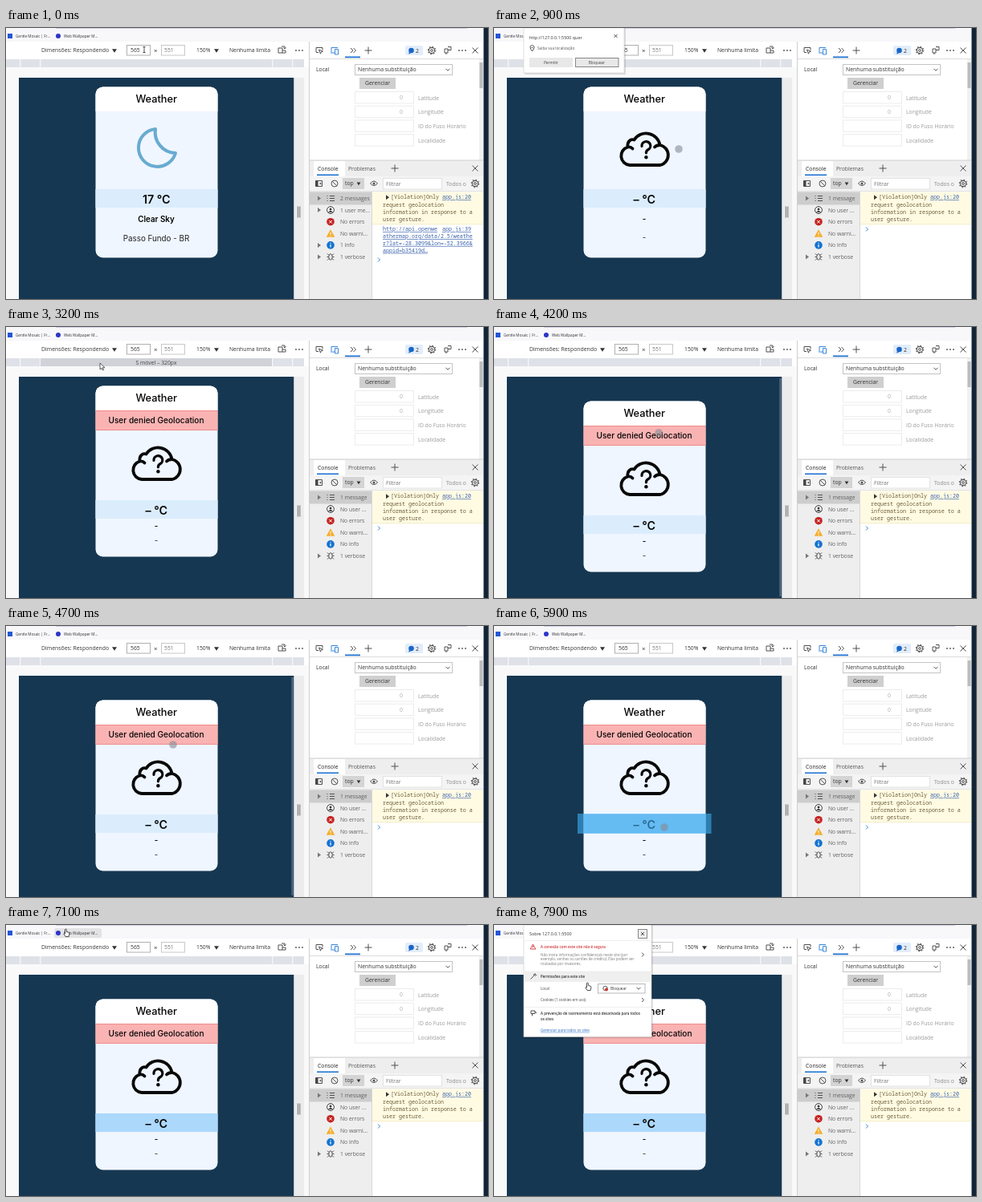
An HTML page for the animation above (8 s loop, 600x338 px).

```html
<!DOCTYPE html>
<html lang="pt-BR">
<head>
<meta charset="utf-8">
<title>Weather</title>
<style>
  html, body { margin: 0; width: 100%; height: 100%; overflow: hidden; background: #fff; }
  svg { display: block; width: 600px; height: 338px; }
  text { font-family: "Open Sans", "Noto Sans", sans-serif; font-size: 6.8px; fill: #333; white-space: pre; }
  .card text { font-family: Inter, Roboto, sans-serif; font-weight: 500; text-anchor: middle; }
  .mono { font-family: "Noto Sans Mono", "DejaVu Sans Mono", monospace; font-size: 6.67px; fill: #6a5c38; }
  .link { fill: #3a62ae; text-decoration: underline; }
  .line { fill: none; stroke: #505050; stroke-width: 1; }
  .blue { stroke: #3a86d8; }
</style>
</head>
<body>
<svg id="stage" viewBox="0 0 600 338"></svg>
<script>
const LOOP = 8000, STEP = 100;

const rect = (x, y, w, h, fill, more = '') =>
  `<rect x="${x}" y="${y}" width="${w}" height="${h}" fill="${fill}" ${more}/>`;
const text = (x, y, s, more = '') =>
  `<text x="${x}" y="${y}" ${more}>${s.replace(/&/g, '&amp;')}</text>`;
const path = (d, more = 'class="line"') => `<path d="${d}" ${more}/>`;
const dot = (x, y, r, fill, more = '') => `<circle cx="${x}" cy="${y}" r="${r}" fill="${fill}" ${more}/>`;
const group = (id, body, more = '') => `<g id="${id}" ${more}>${body}</g>`;
const size = (px, fill = '#333', more = '') => `style="font-size:${px}px;fill:${fill};${more}"`;
const box = (x, y, w, h, stroke, fill = '#fff') =>
  rect(x + .5, y + .5, w - 1, h - 1, fill, `stroke="${stroke}"`);

const plus = (x, y) => path(`M${x - 4.5} ${y}h9M${x} ${y - 4.5}v9`);
const cross = (x, y, r = 3.5) => path(`M${x - r} ${y - r}l${2 * r} ${2 * r}m0 ${-2 * r}l${-2 * r} ${2 * r}`);
const dots = (x, y) => [-4, 0, 4].map(d => dot(x + d, y, .9, '#505050')).join('');
const down = (x, y, r = 3) => path(`M${x - r} ${y - r / 2}h${2 * r}l${-r} ${r * 1.5}z`, 'fill="#333"');
const chevron = (x, y) => path(`M${x - 2.5} ${y - 1.2}l2.5 2.5l2.5 -2.5`);
const play = (x, y, fill = '#777') => path(`M${x} ${y - 3}l4 3l-4 3z`, `fill="${fill}"`);
const gear = (x, y) =>
  dot(x, y, 3.6, 'none', 'stroke="#555" stroke-width="1.1"') + dot(x, y, 1.4, 'none', 'stroke="#555"') +
  dot(x, y, 4.7, 'none', 'stroke="#555" stroke-width="1.2" stroke-dasharray="1.5 2.19"');

function browserBar() {
  return rect(0, 0, 594, 17, '#f8f8fa') + rect(62, 0, 512, .8, '#c6c6e2') +
    group('tabHover', rect(60, 4, 59, 12, '#e3e3e6', 'rx="2"')) +
    rect(2, 7, 6, 6, '#2457d6') + dot(65, 10, 3, '#2b35c8') +
    text(12, 11.8, 'Gentle Mosaic | Fr...', size(4.6)) +
    text(72, 11.8, 'Web Wallpaper M...', size(4.7));
}

function deviceBar() {
  const ticks = [17, 42, 331, 356].map(x => rect(x, 39, 1.4, 10, '#f4f5f9')).join('');
  return rect(0, 17, 377, 22, '#fff') +
    text(44, 30.4, 'Dimensões: Respondendo', size(6.9)) + down(135, 27.7) +
    box(150, 21, 30, 13.5, '#b0b0b0') + text(155, 30.4, '565') +
    text(184, 30.6, '×', size(8)) +
    box(193, 21, 30, 13.5, '#c8c8c8') + text(197, 30.4, '551', size(6.8, '#777')) +
    text(237, 30.4, '150%') + down(262, 27.7) + text(278, 30.4, 'Nenhuma limita') +
    path('M339 25h5v6h-5zM344 28h4v3h-4M343 23h4v3m-1.5 -1.5l1.5 1.5l1.5 -1.5') + dots(365, 28) +
    rect(0, 39, 371, 10, '#dfe1e8') + ticks +
    group('rulerHover', rect(43, 39, 288, 10, '#d0d2d8') +
      text(187, 46.6, 'S móvel – 320px', size(6.8, '#444', 'text-anchor:middle')));
}

function viewport() {
  return rect(0, 49, 377, 289, '#f9f9fa') + rect(16, 62, 342.5, 276, '#163751') +
    group('scrollThumb', rect(355.5, 64, 2, 272, '#9aa8b4', 'opacity=".5"')) +
    rect(358.5, 62, 12.5, 276, '#ececed') + rect(362, 222, 5, 15, '#d0d0d0') +
    path('M363.5 223v13m2.2 -13v13', 'stroke="#888" stroke-width=".9"');
}

function sensors() {
  const fields = ['Latitude', 'Longitude', 'ID do Fuso Horário', 'Localidade'].map((s, i) => {
    const y = 79 + i * 17.7;
    return box(434, y, 74, 15.5, '#ececec') + text(513, y + 10.6, s, size(6.8, '#9a9a9a')) +
      (i < 2 ? text(490, y + 10.2, '0', size(6.8, '#aaa')) : '');
  }).join('');
  return rect(377, 17, 217, 321, '#fff') + rect(377, 17, 1, 321, '#cfcfcf') +
    path('M386 30v-5.5h8v3M386 30.5h3M389.5 27l5 2.2l-2.2 .8l-.8 2.2z') +
    path('M405 30v-5.5h8M404 31h5M409.5 26.5h4v6.5h-4z', 'class="line blue"') +
    path('M429 25l3 3l-3 3m3.5 -6l3 3l-3 3') + rect(422, 35.5, 19, 1.7, '#1a6fd0') + plus(451, 28) +
    rect(497, 22, 22, 12, '#e2edfa', 'rx="2"') + dot(504.5, 28, 3.3, '#1a66c8') +
    path('M502 30l-1 2.5l3 -1z', 'fill="#1a66c8"') + text(510, 30.5, '2') +
    gear(530, 28) + path('M546 26h4v5h-4zM550 23.5h4v4h-4M548 31v2') + dots(568, 28) + cross(584, 28) +
    rect(378, 38, 216, 1, '#dcdcdc') +
    text(386, 54.2, 'Local') + box(434, 45, 122, 14, '#c4c4c4') +
    text(438, 54.2, 'Nenhuma substituição', size(6.9)) + chevron(550, 52) +
    rect(440, 62, 45, 14, '#cfcfcf') + text(462.5, 71.3, 'Gerenciar', size(6.8, '#333', 'text-anchor:middle')) +
    fields + rect(589, 39, 5, 126, '#f1f1f1') + rect(589.5, 43, 4, 32, '#bcbcbc');
}

function consoleBar() {
  return rect(378, 165, 216, 20, '#eeeeef') + rect(378, 164.5, 216, 1, '#cfcfcf') +
    rect(383, 166, 39, 19, '#fff') + text(388, 177.7, 'Console', size(6.8, '#222')) +
    rect(387, 182.5, 27, 1.6, '#1a6fd0') + text(426, 177.7, 'Problemas', size(6.8, '#555')) +
    plus(484, 175) + cross(584, 175) +
    rect(378, 185, 216, 19, '#f4f4f4') + rect(378, 203.5, 216, .8, '#d8d8d8') +
    path('M385.5 190.5h8v7h-8z') + rect(385.5, 190.5, 3, 7, '#444') + path('M390 194l2.2 -1.6v3.2z', 'fill="#444"') +
    dot(409, 194, 4, 'none', 'stroke="#555"') + path('M406.2 191.2l5.6 5.6') +
    rect(419, 187, 27, 14, '#d4d4d5') + text(422, 196.3, 'top') + down(439, 193.8, 2.4) +
    path('M453.5 194q4.5 -6 9 0q-4.5 5 -9 0z') + dot(458, 194, 1.5, '#555') +
    box(469, 187, 74, 14.5, '#e2e2e2') + text(473, 196.5, 'Filtrar', size(6.8, '#777')) +
    text(548, 196.5, 'Todos o', size(6.8, '#888')) + gear(584, 194);
}

const rowY = i => 212.5 + i * 14.6;

function sidebar() {
  const people = rowY(1), err = rowY(2), warn = rowY(3), info = rowY(4), bug = rowY(5);
  return rect(378, 204, 77, 134, '#eeeeee') + rect(378, 204.5, 77, 16, '#cdcdcd') +
    rect(455, 204, .8, 134, '#cfcfcf') +
    path('M403 209.5h6m-6 3h6m-6 3h6M399.5 209.5h1m-1 3h1m-1 3h1') +
    dot(404, people, 4.4, '#fff', 'stroke="#333"') + dot(404, people - 1.2, 1.5, '#333') +
    path(`M401 ${people + 3}q3 -4 6 0z`, 'fill="#333"') +
    dot(404, err, 4.8, '#c5221f') + path(`M402.2 ${err - 1.8}l3.6 3.6m0 -3.6l-3.6 3.6`, 'stroke="#fff"') +
    path(`M404 ${warn - 5}l5.3 9.5h-10.6z`, 'fill="#f5ad2b"') + path(`M404 ${warn - 1.5}v3m0 1v1`, 'stroke="#fff"') +
    dot(404, info, 4.8, '#1473d1') + path(`M404 ${info - 3}v1.2m0 1v3.5`, 'stroke="#fff" stroke-width="1.2"') +
    `<ellipse cx="404" cy="${bug}" rx="2.2" ry="3.8" class="line"/>` +
    path(`M399.5 ${bug}h2.3m4.4 0h2.3M400 ${bug - 4}l2 2m4 0l2 -2M400 ${bug + 4}l2 -2m4 0l2 2`) +
    play(388, rowY(0)) + play(388, bug);
}

const counts = list => list.map((s, i) => text(416, rowY(i) + 2.5, s, size(6.8, '#606060'))).join('');
const mono = (x, y, s, link) => text(x, y, s, `class="mono${link ? ' link' : ''}"`);
const prompt = y => path(`M463 ${y - 2.5}l2.5 2.5l-2.5 2.5`, 'class="line blue"');

function messages() {
  const call = ['http://api.openwe', 'athermap.org/data/2.5/weathe', 'r?lat=-28.3099&lon=-52.3966&', 'appid=b35419d…'];
  return rect(456, 204.5, 138, 40.5, '#fffbe3') + rect(456, 244.5, 138, .7, '#f0e6b8') +
    play(473, 211.2, '#333') + mono(479, 213.4, '[Violation]Only') + mono(543, 213.4, 'app.js:20', true) +
    ['request geolocation', 'information in response to a', 'user gesture.']
      .map((s, i) => mono(469, 222.7 + i * 9.2, s)).join('') +
    group('logFull', call.map((s, i) => mono(469, 253.3 + i * 8.8, s, true)).join('') +
      mono(543, 253.3, 'app.js:39', true) + prompt(289) + play(388, rowY(1)) + play(388, rowY(4)) +
      counts(['2 messages', '1 user me...', 'No errors', 'No warni...', '1 info', '1 verbose'])) +
    group('logShort', prompt(251) +
      counts(['1 message', 'No user ...', 'No errors', 'No warni...', 'No info', '1 verbose']));
}

const cloud = dy => `<g transform="translate(0 ${dy})" fill="none" stroke="#080808" stroke-width="3.8" stroke-linecap="round" stroke-linejoin="round">` +
  path('M169 171A11.5 11.5 0 0 1 166.5 148.5C165.5 141.5 170 138 174.5 139.5A17.5 17.5 0 0 1 206.5 146A12.8 12.8 0 0 1 207 171Z' +
    'M166.5 148.5q4 -.5 6 2M206.5 146q-4 0 -6.5 2.5', '') +
  path('M184 147.5A5.4 5.4 0 1 1 191.8 151.8Q189.4 153 189.4 155.8', 'stroke-width="3.2"') +
  dot(189.4, 161.2, 2.2, '#080808', 'stroke="none"') + '</g>';

const moon = path('M186 126A23.5 23.5 0 1 0 211 156A26 26 0 0 1 186 126Z',
  'fill="none" stroke="#68abd0" stroke-width="4" stroke-linejoin="round"');

const BLACK = '#050505';

function report(top, temp, sky, skyY, place, placeY) {
  return rect(111, top, 153, 23, '#dbedfd', 'class="band"') +
    text(187.3, top + 18, temp, size(14.3, BLACK, 'font-weight:600')) +
    text(187, skyY, sky, size(9.8, BLACK, 'font-weight:600')) +
    text(187, placeY, place, size(9.8, '#222', 'font-weight:400'));
}

function card() {
  return '<clipPath id="round"><rect x="111.5" y="73.5" width="152" height="213" rx="9"/></clipPath>' +
    group('card', '<g clip-path="url(#round)">' + rect(111, 73, 153, 214, '#eff6ff') + rect(111, 73, 153, 31, '#fff') +
      text(187.2, 93.4, 'Weather', size(12.8, BLACK)) +
      group('clear', moon + report(201, '17 °C', 'Clear Sky', 242.3, 'Passo Fundo - BR', 265.5)) +
      group('empty', cloud(0) + report(201, '– °C', '-', 241, '-', 265)) +
      group('denied', rect(111.5, 104.5, 152, 24, '#fab3b3', 'stroke="#ee8b8b"') +
        text(187, 120, 'User denied Geolocation', size(10.1, BLACK)) + cloud(19) +
        report(216, '– °C', '-', 250.8, '-', 269.8)) + '</g>' +
      group('tap', rect(104, 215, 166.5, 25, '#3aabee', 'opacity=".62"')), 'class="card"');
}

const frame = (w, h) => rect(38, 0, w + 1, h + 2, '#000', 'opacity=".12"') + rect(37, 0, w, h, '#fff', 'stroke="#ccc" stroke-width=".6"');

function askPopup() {
  const label = (x, s) => text(x, 44.8, s, size(4.8, '#444', 'text-anchor:middle'));
  return frame(125, 56) + text(44, 14, 'http://127.0.0.1:5500 quer', size(5.4)) + cross(151.5, 10, 2) +
    path('M47.5 29q-5 -6.5 0 -7.5q5 1 0 7.5z') + dot(47.5, 24.5, .8, '#444') +
    text(54, 27, 'Saiba sua localização', size(4.75, '#555')) +
    rect(44, 37, 54, 12, '#e8e8e8') + label(71, 'Permitir') +
    box(101, 37, 54.5, 12, '#888', '#e8e8e8') + label(128, 'Bloquear');
}

function sitePopup() {
  const small = (y, s, fill = '#444', more = '') => text(58, y, s, size(4.5, fill, more));
  const next = y => path(`M184 ${y - 2.5}l2.5 2.5l-2.5 2.5`);
  return frame(159, 139.5) + text(44, 13, 'Sobre 127.0.0.1:5500', size(5.4)) +
    box(179, 5, 12, 12, '#888', '#eee') + cross(185, 11, 2) + rect(37, 19, 159, .6, '#e4e4e4') +
    path('M48.5 24l3.3 6h-6.6zM48.5 26v2', 'fill="none" stroke="#d13438" stroke-width=".9"') +
    small(28.8, 'A conexão com este site não é segura', '#d13438', 'font-weight:600') +
    ['Não insira informações confidenciais neste site (por', 'exemplo, senhas ou cartões de crédito). Elas podem ser', 'roubadas por invasores.']
      .map((s, i) => small(38.8 + i * 5.6, s, '#777')).join('') + next(37) +
    rect(37, 57.5, 159, 13.5, '#efefef') + path('M45.5 67.5l4 -4q-.5 -3 2.5 -2.5l-1.5 1.5l1 1l1.5 -1.5') +
    small(66.3, 'Permissões para este site', '#333', 'font-weight:600') +
    small(80.7, 'Local') + box(129, 73, 59.5, 12.5, '#b8b8b8') +
    dot(138.5, 79, 2.7, 'none', 'stroke="#555"') + dot(140, 80.5, 2, '#d13438') +
    text(145, 80.9, 'Bloquear', size(4.7)) + chevron(180, 79) +
    small(95.4, 'Cookies (1 cookies em uso)') + next(93.5) + rect(37, 102, 159, .6, '#e4e4e4') +
    path('M46 107h5v3.5h-5zM47.5 110.5v3M51 108l2 2') +
    small(112.3, 'A prevenção de rastreamento está desativada para todos', '#333', 'font-weight:600') +
    small(118.5, 'os sites', '#333', 'font-weight:600') +
    small(132.8, 'Gerenciar para todos os sites', '#2468c4', 'text-decoration:underline');
}

const pointers =
  group('arrow', path('M0 0v8l2 -1.8l1.3 2.8l1.3 -.6l-1.3 -2.7h2.7z', 'fill="#fff" stroke="#222" stroke-width=".7"')) +
  group('beam', path('M-1.5 -3.5h3M0 -3.5v7M-1.5 3.5h3', 'fill="none" stroke="#222" stroke-width=".8"')) +
  group('hand', path('M-1.5 -4.5q1 -1 1.8 0v3l3 .8q.9 .4 .6 1.8l-.8 3.4h-4l-2.3 -3.5q.6 -1.2 1.7 0z', 'fill="#fff" stroke="#222" stroke-width=".8"')) +
  group('touch', dot(0, 0, 4.8, '#858a94', 'opacity=".6"'));

const stage = document.getElementById('stage');
stage.innerHTML = rect(0, 0, 600, 338, '#fff') + viewport() + deviceBar() + browserBar() +
  sensors() + consoleBar() + sidebar() + messages() + card() +
  rect(594.5, 0, 5.5, 338, '#122436') + group('ask', askPopup()) + group('site', sitePopup()) +
  group('pointer', pointers);

// id, from, to
const shown = [
  ['clear', 0, 500], ['empty', 500, 2800], ['denied', 2800, LOOP],
  ['logFull', 0, 500], ['logShort', 500, LOOP],
  ['ask', 700, 2700], ['site', 7400, LOOP],
  ['rulerHover', 2700, 3600], ['tabHover', 7000, 7200],
  ['scrollThumb', 3600, 5100], ['tap', 5800, 6100]
];

// time, x, y, pointer kind
const route = [
  [0, 172, 27, 'beam'], [100, 168, 22, 'beam'], [200, 150, 12, 'arrow'], [300, 60, 3, 'arrow'],
  [400, 38, -9, 'arrow'], [600, 38, -9, 'arrow'], [700, 120, 65, 'touch'], [900, 230, 151, 'touch'],
  [1200, 230, 151, 'touch'], [1500, 205, 70, 'touch'], [1600, 205, 70, 'touch'], [1800, 180, 60, 'arrow'],
  [2400, 117, 45, 'arrow'], [3500, 117, 45, 'arrow'], [3600, 140, 72, 'touch'], [4300, 216, 142, 'touch'],
  [4500, 216, 142, 'touch'], [4700, 208, 148, 'touch'], [5400, 208, 148, 'touch'], [5800, 212, 251, 'touch'],
  [6100, 212, 251, 'touch'], [6400, 204, 238, 'touch'], [6700, 150, 90, 'touch'], [6900, 100, 30, 'arrow'],
  [7100, 75, 10, 'hand'], [7200, 48, 4, 'arrow'], [7300, 42, -9, 'arrow'], [7400, 42, -9, 'arrow'],
  [7600, 85, 55, 'hand'], [7800, 117, 77, 'hand'], [LOOP, 117, 77, 'hand']
];

const byId = id => document.getElementById(id);
const show = (id, on) => byId(id).setAttribute('display', on ? 'inline' : 'none');
const shift = (id, x, y) => byId(id).setAttribute('transform', `translate(${x} ${y})`);
const lastBand = stage.querySelector('#denied .band');

function draw() {
  const t = Math.floor(performance.now() % LOOP / STEP) * STEP;
  for (const [id, from, to] of shown) show(id, t >= from && t < to);
  shift('card', 0, t >= 3600 ? 19 : 0);
  lastBand.setAttribute('fill', t >= 5800 ? '#acd8fc' : '#dbedfd');

  const i = route.findIndex(p => p[0] > t) - 1;
  const [t0, x0, y0, kind] = route[i], [t1, x1, y1] = route[i + 1];
  const k = (t - t0) / (t1 - t0);
  shift('pointer', x0 + (x1 - x0) * k, y0 + (y1 - y0) * k);
  for (const id of ['arrow', 'beam', 'hand', 'touch']) show(id, id === kind);
  requestAnimationFrame(draw);
}
draw();
</script>
</body>
</html>
```
